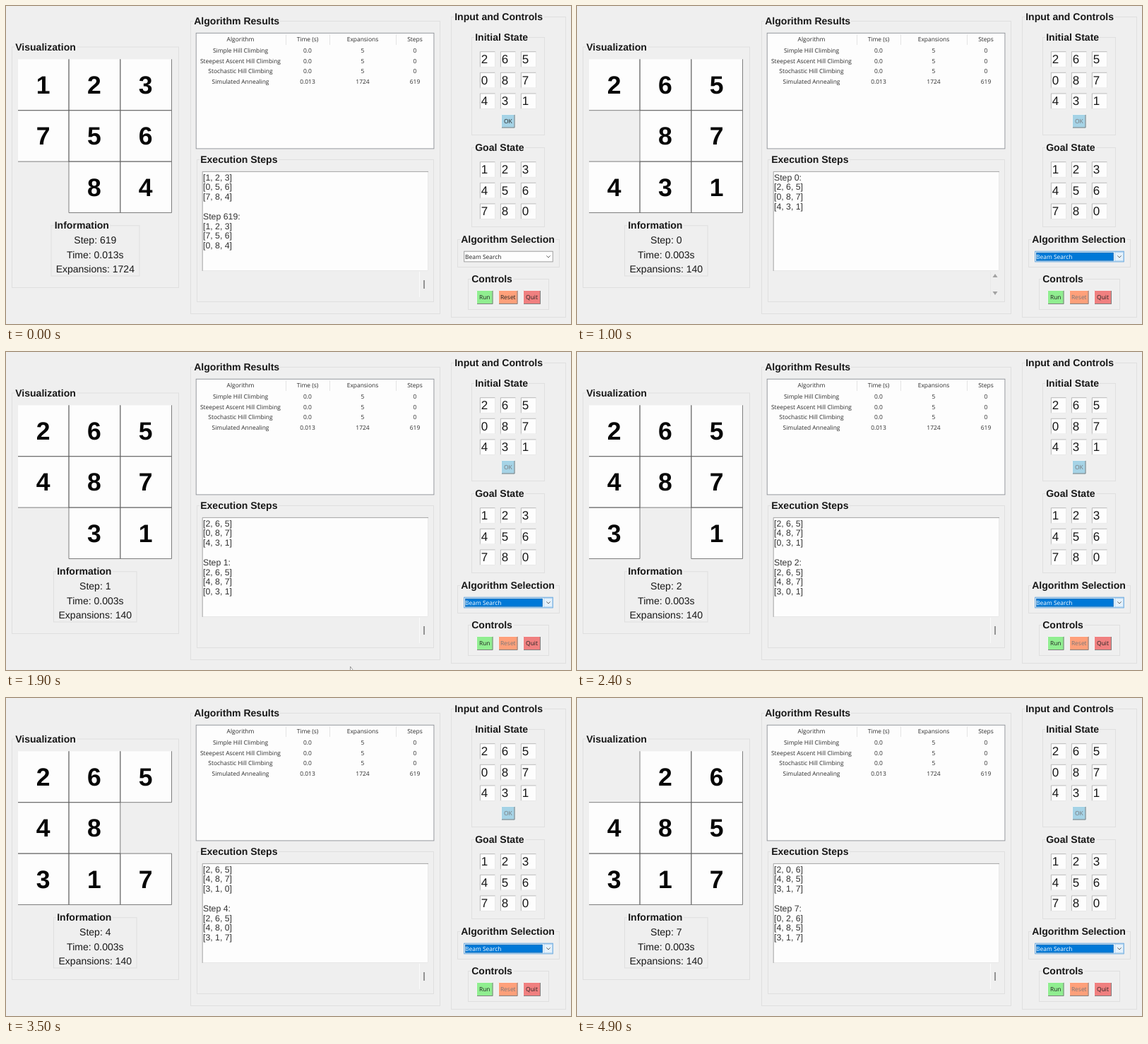
Recreate the animation shown at these times as an HTML page. Size 800 by 450 pixels, loop 5000 ms.

```html
<!DOCTYPE html>
<html lang="en">
<head>
<meta charset="utf-8">
<title>8-puzzle solver</title>
<style>
  html, body { margin: 0; width: 100%; height: 100%; overflow: hidden; background: #efefef; }
  svg { display: block; width: 800px; height: 450px; }
  text { font-family: "Liberation Sans", Arial, sans-serif; fill: #181818; white-space: pre; text-rendering: geometricPrecision; }
  .head { font-size: 14.05px; font-weight: bold; }
  .info { font-size: 14px; }
  .tile { font-size: 35.5px; font-weight: bold; fill: #050505; }
  .entry { font-size: 17px; }
  .log { font-size: 12.3px; fill: #333; }
  .ui { font-family: "Open Sans", "Noto Sans", sans-serif; font-size: 8.45px; fill: #2c2c2c; }
</style>
</head>
<body>
<svg id="stage" viewBox="0 0 800 450"></svg>
<script>
const LOOP = 5000;
const STEP_TIMES = [900, 1500, 2000, 2600, 3100, 3700, 4200, 4800];
const BLANK_PATH = [3, 6, 7, 8, 5, 2, 1, 0];
const POINTER = [1900, 2000];
const COLS = [17, 89, 161.8, 234.5], ROWS = [75.3, 147.7, 220.1, 292.5];
const BG = '#efefef';

const rect = (x, y, x2, y2, fill, stroke = 'none', w = 1) =>
  `<rect x="${x}" y="${y}" width="${x2 - x}" height="${y2 - y}" fill="${fill}" stroke="${stroke}" stroke-width="${w}"/>`;
const path = (d, stroke, w = 1, fill = 'none') =>
  `<path d="${d}" fill="${fill}" stroke="${stroke}" stroke-width="${w}"/>`;
// y is the middle of the capitals
const text = (s, x, y, cls, size, anchor = 'start', fill = '') =>
  `<text class="${cls}" x="${x}" y="${y + size * 0.36}" text-anchor="${anchor}"${fill && ` style="fill:${fill}"`}>${s}</text>`;
const ui = (s, x, y, anchor = 'middle', fill = '') => text(s, x, y, 'ui', 8.45, anchor, fill);

function group(title, x, y, x2, y2, titleWidth) {
  const tx = x + 5;
  return rect(x + .5, y + .5, x2 - .5, y2 - .5, 'none', '#dfdfdf') +
    rect(tx - 1, y - 2, tx + titleWidth + 2, y + 3, BG) +
    text(title, tx + .2, y, 'head', 14);
}

function button(label, x, y, x2, y2, color, off) {
  return rect(x, y, x2, y2, color) +
    path(`M${x + .5} ${y2}V${y + .5}H${x2}`, '#f4f4f4') +
    path(`M${x + 1} ${y2 - .5}H${x2 - .5}V${y + 1}`, '#808080') +
    ui(label, (x + x2) / 2, (y + y2) / 2, 'middle', off ? '#77777a' : '#222');
}

function entries(digits, top) {
  return [...digits].map((d, i) => {
    const x = 671 + (i % 3) * 29, y = top + Math.floor(i / 3) * 29.6;
    return rect(x, y, x + 22, y + 22.5, '#fdfdfd') +
      path(`M${x + .4} ${y + 22.5}V${y + .4}H${x + 22}`, '#a8a8a8', .8) +
      path(`M${x} ${y + 22}H${x + 21.5}V${y}`, '#e8e8e8') +
      text(d, x + 1.7, y + 10.7, 'entry', 17);
  }).join('');
}

function table() {
  const mids = [332, 427, 505, 579];
  const rows = [
    ['Algorithm', 'Time (s)', 'Expansions', 'Steps'],
    ['Simple Hill Climbing', '0.0', '5', '0'],
    ['Steepest Ascent Hill Climbing', '0.0', '5', '0'],
    ['Stochastic Hill Climbing', '0.0', '5', '0'],
    ['Simulated Annealing', '0.013', '1724', '619']
  ];
  return rect(269.2, 38.3, 605.9, 201.9, '#fdfdfd', '#8c9096', .9) +
    path('M396.5 40V55M458.5 40V55M552.5 40V55', '#e4e4e4') +
    rows.map((r, i) => r.map((s, c) =>
      ui(s, mids[c], i ? 63 + (i - 1) * 14.5 : 47)).join('')).join('');
}

const fixed = rect(0, 0, 800, 450, BG) +
  group('Visualization', 8, 57.5, 245, 399, 86) +
  group('Algorithm Results', 261, 21, 615, 436, 120) + table() +
  group('Execution Steps', 270, 217, 606, 419, 109) +
  rect(278, 234, 598, 375, '#fdfdfd') +
  path('M278.2 375V234.4H598', '#9a9a9a', .9) + path('M279 374.5H597.5V235', '#e8e8e8') +
  group('Input and Controls', 630, 15, 793, 441, 125) +
  group('Initial State', 659, 44, 763, 183, 74) + entries('265087431', 64.3) +
  group('Goal State', 659, 200, 763, 313, 70) + entries('123456780', 220.3) +
  group('Algorithm Selection', 639, 330, 784, 370, 132) +
  group('Controls', 654, 386, 769, 430, 58) +
  button('Run', 666, 402, 689.5, 422, '#90ee90') +
  button('Quit', 732, 402, 757, 422, '#f08080');

function swap(board, a, b) {
  const next = [...board];
  [next[a], next[b]] = [next[b], next[a]];
  return next.join('');
}

const boards = ['265087431'];
for (let i = 1; i < BLANK_PATH.length; i++)
  boards.push(swap(boards[i - 1], BLANK_PATH[i - 1], BLANK_PATH[i]));

const rowsOf = b => [0, 3, 6].map(i => `[${[...b.slice(i, i + 3)].join(', ')}]`);

function tiles(board) {
  let fills = '', lines = '';
  [...board].forEach((d, i) => {
    const c = i % 3, r = Math.floor(i / 3);
    const x = COLS[c], y = ROWS[r], x2 = COLS[c + 1], y2 = ROWS[r + 1];
    if (d === '0') return;
    fills += rect(x, y, x2, y2, '#fdfdfd') +
      text(d, (x + x2) / 2 - .5, (y + y2) / 2 - .5, 'tile', 35.5, 'middle');
    lines += `M${x} ${y2}H${x2}V${y}` + (c ? `M${x} ${y}V${y2}` : '') + (r ? `M${x} ${y}H${x2}` : '');
  });
  return fills + path(lines, '#606060', .8);
}

function info(step, time, count, x, x2) {
  return group('Information', x, 310.3, x2, 382.5, 77) +
    [`Step: ${step}`, `Time: ${time}s`, `Expansions: ${count}`]
      .map((s, i) => text(s, 126.3, 331.2 + i * 20.5, 'info', 14, 'middle')).join('');
}

function log(board, step, before) {
  const lines = [...(before ? [...rowsOf(before), ''] : []), `Step ${step}:`, ...rowsOf(board)];
  return lines.map((s, i) => text(s, 279, 242.2 + i * 13.8, 'log', 12.3)).join('');
}

function scrollbar(start) {
  return start
    ? path('M588.5 384L592 379L595.5 384Z', 'none', 0, '#a2a2a2') +
      path('M588.5 404L592 409L595.5 404Z', 'none', 0, '#a2a2a2') + path('M585.5 376V412', '#e8e8e8')
    : path('M585.5 376V412', '#fafafa') + path('M592 388V400', '#555', 1.2);
}

function combo(active) {
  return rect(648.7, 347.2, 774.2, 361.9, '#fdfdfd', active ? '#4f9ada' : '#969696', .9) +
    (active ? rect(650, 348.7, 760, 360.7, '#0078d7') +
      '<rect x="650.5" y="349.2" width="109" height="11" fill="none" stroke="#ff8728" stroke-width=".7" stroke-dasharray=".8 .8" opacity=".4"/>' +
      rect(761.5, 348.5, 773.4, 360.8, '#e5f1fb', '#9cc8ec', .7) : '') +
    ui('Beam Search', 650, 354.5, 'start', active ? '#fff' : '#222') +
    path('M765.3 353.3L768 356L770.7 353.3', '#555', .9);
}

function scene(step) {
  const idle = step < 0;
  const board = idle ? '123756084' : boards[step];
  const before = idle ? '123056784' : boards[step - 1];
  const n = idle ? 619 : step;
  return fixed + tiles(board) +
    (idle ? info(n, '0.013', 1724, 63.5, 189.5) : info(n, '0.003', 140, 67, 185.5)) +
    log(board, n, before) + scrollbar(step === 0) + combo(!idle) +
    button('OK', 701, 153, 720.5, 172.5, '#a5d3e6', !idle) +
    button('Reset', 697, 402, 724.5, 422, '#ffa07a', !idle);
}

const pointer = path('M487.5 445V454L489.5 452H492.5Z', '#888', .8, '#fff');
const stage = document.getElementById('stage');
let shown = '';

function draw() {
  const t = performance.now() % LOOP;
  const step = STEP_TIMES.filter(s => s <= t).length - 1;
  const hover = t >= POINTER[0] && t < POINTER[1];
  const key = step + '|' + hover;
  if (key !== shown) {
    stage.innerHTML = scene(step) + (hover ? pointer : '');
    shown = key;
  }
  requestAnimationFrame(draw);
}
draw();
</script>
</body>
</html>
```
